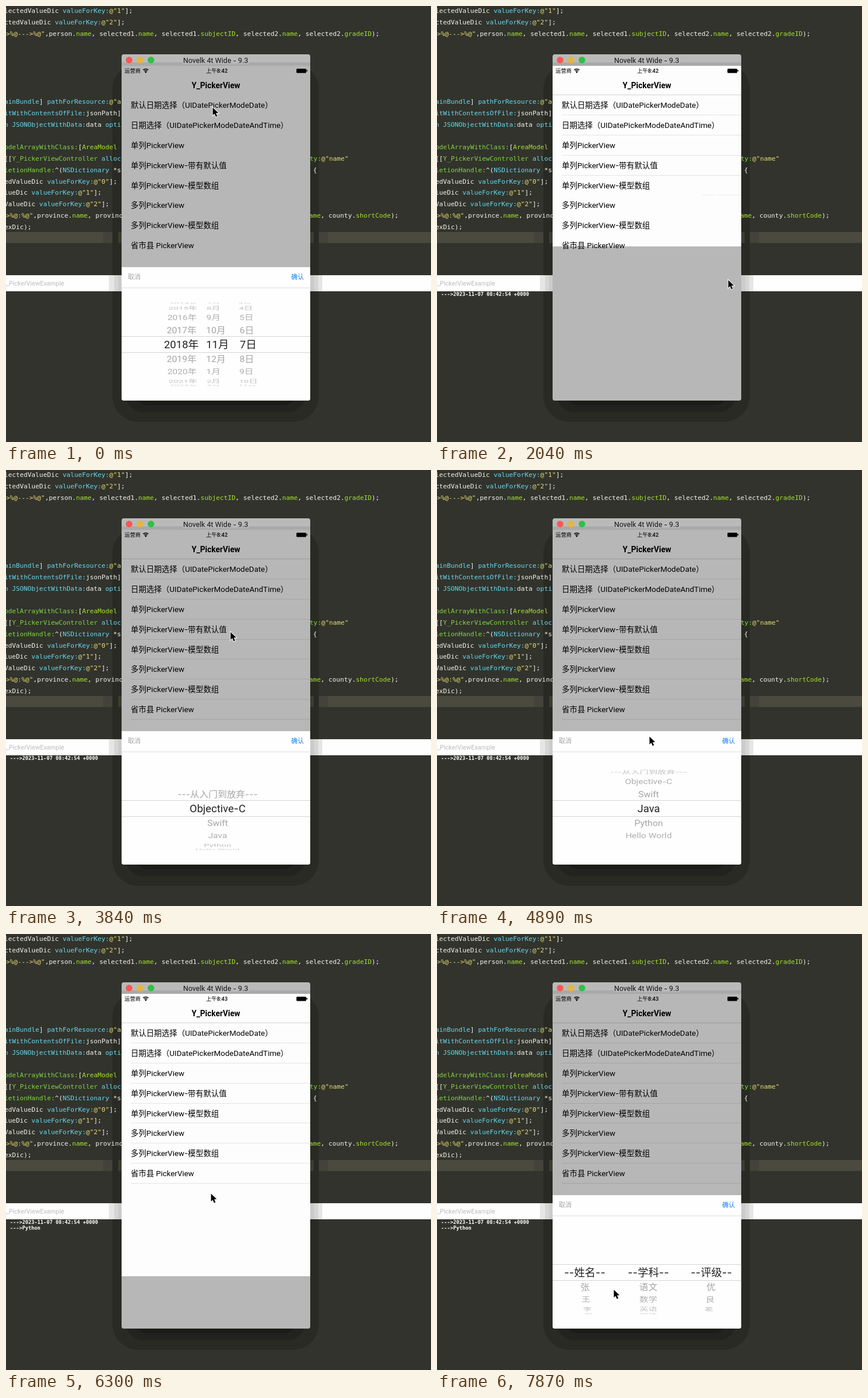
Recreate the animation shown at these times as an HTML page with a canvas. Size 739x758 px, loop 7990 ms.

```html
<!DOCTYPE html>
<html lang="zh-CN">
<head>
<meta charset="utf-8">
<title>Y_PickerView</title>
<style>
html, body { margin: 0; width: 100%; height: 100%; overflow: hidden; background: #32332c; }
canvas { display: block; }
</style>
</head>
<body>
<canvas id="stage" width="739" height="758"></canvas>
<script>
const ctx = document.getElementById('stage').getContext('2d');
const LOOP = 7990, TICK = 119.2;
const CJK = '"Noto Sans CJK SC", "Noto Sans CJK", sans-serif';
const SANS = 'Roboto, ' + CJK;
const DASH = 'Inter, ' + CJK;
const MONO = '"DejaVu Sans Mono", monospace';

const W = '#f4f4ee', C = '#66d9ef', Y = '#e6db74', G = '#a6e22e', M = '#7fd83f';
const valueLine = (head, n) => [-3, head + ' ', W, 'valueForKey:', C, `@"${n}"`, Y, '];', W];

// [line, x, text, colour, text, colour, ...]
const code = [
  [0, ...valueLine('lectedValueDic', 1)],
  [1, ...valueLine('ctedValueDic', 2)],
  [2, 0, '>%@--->%@"', Y, ',person.', W, 'name', G, ', selected1.', W, 'name', G, ', selected1.', W,
    'subjectID', G, ', selected2.', W, 'name', G, ', selected2.', W, 'gradeID', G, ');', W],
  [8, -3, 'ainBundle', C, '] ', W, 'pathForResource:', C, '@"a', Y],
  [9, -3, 'itWithContentsOfFile:', C, 'jsonPath]', W],
  [10, -3, 'n JSONObjectWithData:', C, 'data ', W, 'opti', C],
  [12, -3, 'odelArrayWithClass:', M, '[', W, 'AreaModel', G],
  [13, -3, '[[', W, 'Y_PickerViewController ', M, 'alloc', C],
  [13, 528, 'ty:', M, '@"name"', Y],
  [14, -3, 'letionHandle:', M, '^(', W, 'NSDictionary', C, ' *s', W],
  [14, 534, '{', W],
  [15, ...valueLine('edValueDic', 0)],
  [16, ...valueLine('lueDic', 1)],
  [17, ...valueLine('ValueDic', 2)],
  [18, 0, '>%@:%@"', Y, ',province.', W, 'name', G, ', provinc', W],
  [18, 527, 'ame', G, ', county.', W, 'shortCode', G, ');', W],
  [19, -3, 'exDic);', W]
];

const rows = ['默认日期选择（UIDatePickerModeDate）', '日期选择（UIDatePickerModeDateAndTime）',
  '单列PickerView', '单列PickerView-带有默认值', '单列PickerView-模型数组',
  '多列PickerView', '多列PickerView-模型数组', '省市县 PickerView'];

const wrap = (i, n) => ((i % n) + n) % n + 1;
const list = items => i => items[i];
const dateCols = [
  { x: 305, align: 'center', item: i => 2018 + i + '年' },
  { x: 348, align: 'left', item: i => wrap(i + 10, 12) + '月' },
  { x: 406.5, align: 'left', item: i => wrap(i + 6, 30) + '日' }
];
const langCols = [{ x: 368, align: 'center',
  item: list(['---从入门到放弃---', 'Objective-C', 'Swift', 'Java', 'Python', 'Hello World']) }];
const modelCols = [
  { x: 257, align: 'center', item: list(['--姓名--', '张', '王', '李', '赵']) },
  { x: 367.5, align: 'center', item: list(['--学科--', '语文', '数学', '英语', '物理']) },
  { x: 477, align: 'center', item: list(['--评级--', '优', '良', '差']) }
];

// Motion keys: [tick, value...]
const cursorKeys = [[0, 359, 176], [1, 357, 362], [2, 335, 480], [3, 308, 600], [4, 306, 598],
  [6, 306, 535], [8, 309, 520], [10, 335, 530], [12, 450, 495], [14, 520, 477], [16, 512, 476],
  [17, 506, 476], [19, 500, 470], [25, 391, 298], [26, 390, 282], [33, 390, 281], [35, 375, 480],
  [37, 370, 590], [39, 370, 560], [41, 369, 463], [43, 360, 590], [45, 400, 592], [48, 500, 475],
  [50, 512, 464], [51, 505, 463], [52, 430, 462], [53, 356, 451], [59, 353, 384], [60, 352, 382],
  [63, 352, 382], [64, 348, 430], [66, 307, 618]];
const yearKeys = [[3, 0], [4, .4], [5, 1.4], [6, 2.8], [7, 3.9], [8, 4.5], [9, 4.85], [10, 5]];
const langKeys = [[37, 1], [39, 1.6], [41, 3], [43, 4.2], [45, 4]];
const slideKeys = [[15, 0], [16, 70], [17, 314], [18, 545], [19, 582]];
const slideKeys2 = [[52, 0], [53, 491], [54, 570], [55, 582]];

function at(keys, k) {
  if (k <= keys[0][0]) return keys[0].slice(1);
  for (let i = 1; i < keys.length; i++) {
    const a = keys[i - 1], b = keys[i];
    if (k <= b[0]) {
      const p = (k - a[0]) / (b[0] - a[0]);
      return a.slice(1).map((v, j) => v + (b[j + 1] - v) * p);
    }
  }
  return keys[keys.length - 1].slice(1);
}

function box(x, y, w, h, fill) {
  ctx.fillStyle = fill;
  ctx.fillRect(x, y, w, h);
}

function round(x, y, w, h, r, fill) {
  ctx.beginPath();
  ctx.roundRect(x, y, w, h, r);
  ctx.fillStyle = fill;
  ctx.fill();
}

function disc(x, y, r, fill) {
  ctx.beginPath();
  ctx.arc(x, y, r, 0, 7);
  ctx.fillStyle = fill;
  ctx.fill();
}

// Hyphens use a face with wider dashes.
function label(text, x, y, size, fill, align = 'left', weight = 400) {
  const parts = text.split(/(-+)/).map(s => {
    const font = `${weight} ${size}px ${s[0] === '-' ? DASH : SANS}`;
    ctx.font = font;
    return { s, font, w: ctx.measureText(s).width };
  });
  const width = parts.reduce((sum, p) => sum + p.w, 0);
  if (align === 'center') x -= width / 2;
  ctx.fillStyle = fill;
  for (const p of parts) {
    ctx.font = p.font;
    ctx.fillText(p.s, x, y + size * .36);
    x += p.w;
  }
}

function drawEditor(k) {
  box(0, 0, 739, 758, '#32332c');
  box(0, 393, 739, 19, '#4b4a3e');
  box(169, 393, 391, 19, '#444339');
  round(185, 100, 359, 623, 45, '#292a24');
  round(208, 640, 312, 66, 30, '#22231e');
  round(222, 640, 284, 54, 24, '#1b1c17');
  box(195, 393, 340, 19, '#3d3c33');

  ctx.font = `11.245px ${MONO}`;
  for (const [line, x0, ...parts] of code) {
    let x = x0;
    for (let i = 0; i < parts.length; i += 2) {
      ctx.fillStyle = parts[i + 1];
      ctx.fillText(parts[i], x, 12 + line * 19.77);
      x += ctx.measureText(parts[i]).width;
    }
  }

  box(0, 468, 739, 28, '#fefefe');
  box(179, 468, 371, 28, '#e6e6e6');
  box(188, 468, 355, 28, '#d6d6d6');
  box(195, 468, 341, 28, '#cbcbcb');
  label('_PickerViewExample', 0, 482, 11, '#bcbcbc');

  ctx.font = `bold 8.77px ${MONO}`;
  ctx.fillStyle = '#fff';
  if (k >= 16) ctx.fillText('] --->2023-11-07 08:42:54 +0000', -3.5, 503.5);
  if (k >= 52) ctx.fillText('] --->Python', -3.5, 514);
}

function drawStatus(k) {
  label('运营商', 206, 112.5, 9.4, '#000');
  ctx.strokeStyle = '#000';
  ctx.lineWidth = 1.5;
  for (const r of [3.8, 6.6]) {
    ctx.beginPath();
    ctx.arc(243, 116, r, -2.35, -.79);
    ctx.stroke();
  }
  disc(243, 115, 1.4, '#000');
  label(k < 43 ? '上午8:42' : '上午8:43', 366.5, 112.5, 9.5, '#000', 'center', 500);
  round(505, 109, 17, 7.5, 1.5, '#000');
  box(522.5, 111, 1.5, 3, '#000');
}

function drawList(k) {
  box(201, 104, 328, 582, '#fdfdfd');
  const pressed = k >= 28 && k <= 30 ? 3 : k === 62 ? 6 : -1;
  if (pressed >= 0) box(201, 155 + pressed * 34.8, 328, 35, '#d9d9d9');
  drawStatus(k);
  label('Y_PickerView', 365, 138, 13.8, '#000', 'center', 700);
  const lines = k < 16 ? 0 : k < 18 ? 4 : 8;
  if (lines) box(201, 154, 328, 1, '#d2d2d2');
  rows.forEach((text, i) => {
    const y = 172.5 + i * 34.8;
    label(text, 217, y, 13.46, '#000');
    if (i < lines) box(217, Math.round(y + 16.6), 312, 1, '#e4e4e6');
  });
  if (k === 17) {
    box(461, 328, 24, 1, '#eee');
    box(488, 328, 41, 1, '#eee');
  }
}

function clipped(y, h, paint) {
  ctx.save();
  ctx.beginPath();
  ctx.rect(201, y, 328, h);
  ctx.clip();
  paint();
  ctx.restore();
}

// A wheel of radius 73 with 20 degrees between rows.
function drawWheel(col, pos) {
  const base = Math.round(pos);
  const each = paint => {
    for (let i = base - 4; i <= base + 4; i++) {
      const text = col.item(i), n = i - pos;
      if (text && Math.abs(n) < 4.4) paint(text, n);
    }
  };
  const outer = () => each((text, n) => {
    const a = n * Math.PI / 9, c = Math.cos(a), s = 1 - .08 * (1 - c);
    ctx.save();
    ctx.translate(366, 588.5 + 73 * Math.sin(a));
    ctx.scale(s, Math.max(c, .05));
    label(text, col.x - 366, 0, 16, `rgba(35,35,35,${.42 * (.35 + .65 * c)})`, col.align);
    ctx.restore();
  });
  clipped(513, 62, outer);
  clipped(603, 62, outer);
  clipped(575, 27, () => each((text, n) => {
    if (Math.abs(n) < 1) label(text, col.x, 588.5 + n * 28, 18.6, '#222', col.align);
  }));
}

function drawSheet(cols, positions, shift) {
  ctx.save();
  ctx.translate(0, shift);
  box(201, 454, 328, 232, '#fefefe');
  label('取消', 212, 471, 11, '#a2a2a2');
  label('确认', 496, 471, 11, '#0b7df2');
  box(201, 489.5, 328, 1, '#dedede');
  cols.forEach((col, i) => drawWheel(col, positions[i]));
  box(201, 574, 328, 1, '#d4d4d4');
  box(201, 602, 328, 1, '#d4d4d4');
  ctx.restore();
}

function drawModal(k) {
  let cols, positions, opened, slide = 0;
  if (k < 19) {
    [cols, positions, opened] = [dateCols, [at(yearKeys, k)[0], 0, 0], -9];
    slide = at(slideKeys, k)[0];
  } else if (k >= 30 && k < 55) {
    [cols, positions, opened] = [langCols, at(langKeys, k), 30];
    slide = at(slideKeys2, k)[0];
  } else if (k >= 62) {
    [cols, positions, opened] = [modelCols, [0, 0, 0], 62];
  } else return;
  const rise = at([[opened, 0], [opened + 1, .9], [opened + 2, 1]], k)[0];
  box(201, 104 + slide, 328, 582 - slide, 'rgba(0,0,0,.28)');
  drawSheet(cols, positions, slide + (1 - rise) * 232);
}

function drawPhone(k) {
  ctx.save();
  ctx.beginPath();
  ctx.roundRect(201, 84, 328, 602, 4);
  ctx.clip();
  box(201, 84, 328, 20, '#bababa');
  box(201, 98, 328, 6, '#a9a9a9');
  box(307, 98, 115, 3, '#b5b5b5');
  disc(214, 94, 5.8, '#fb5850');
  disc(233, 94, 5.8, '#e7b53c');
  disc(252, 94, 5.8, '#2fc045');
  label('Novelk 4t Wide - 9.3', 364.5, 94, 12.6, '#151515', 'center');
  drawList(k);
  drawModal(k);
  ctx.restore();
}

function drawCursor(k) {
  const [x, y] = at(cursorKeys, k);
  ctx.save();
  ctx.translate(x + .5, y + .5);
  ctx.beginPath();
  ctx.moveTo(0, 0);
  for (const [px, py] of [[0, 13.5], [3.1, 10.7], [5.4, 16], [7.8, 15], [5.5, 9.8], [9.8, 9.6]]) ctx.lineTo(px, py);
  ctx.closePath();
  ctx.lineWidth = 2;
  ctx.strokeStyle = '#fff';
  ctx.stroke();
  ctx.fillStyle = '#000';
  ctx.fill();
  ctx.restore();
}

function frame() {
  const k = Math.floor((performance.now() % LOOP + 31) / TICK);
  drawEditor(k);
  drawPhone(k);
  drawCursor(k);
  requestAnimationFrame(frame);
}
frame();
</script>
</body>
</html>
```
